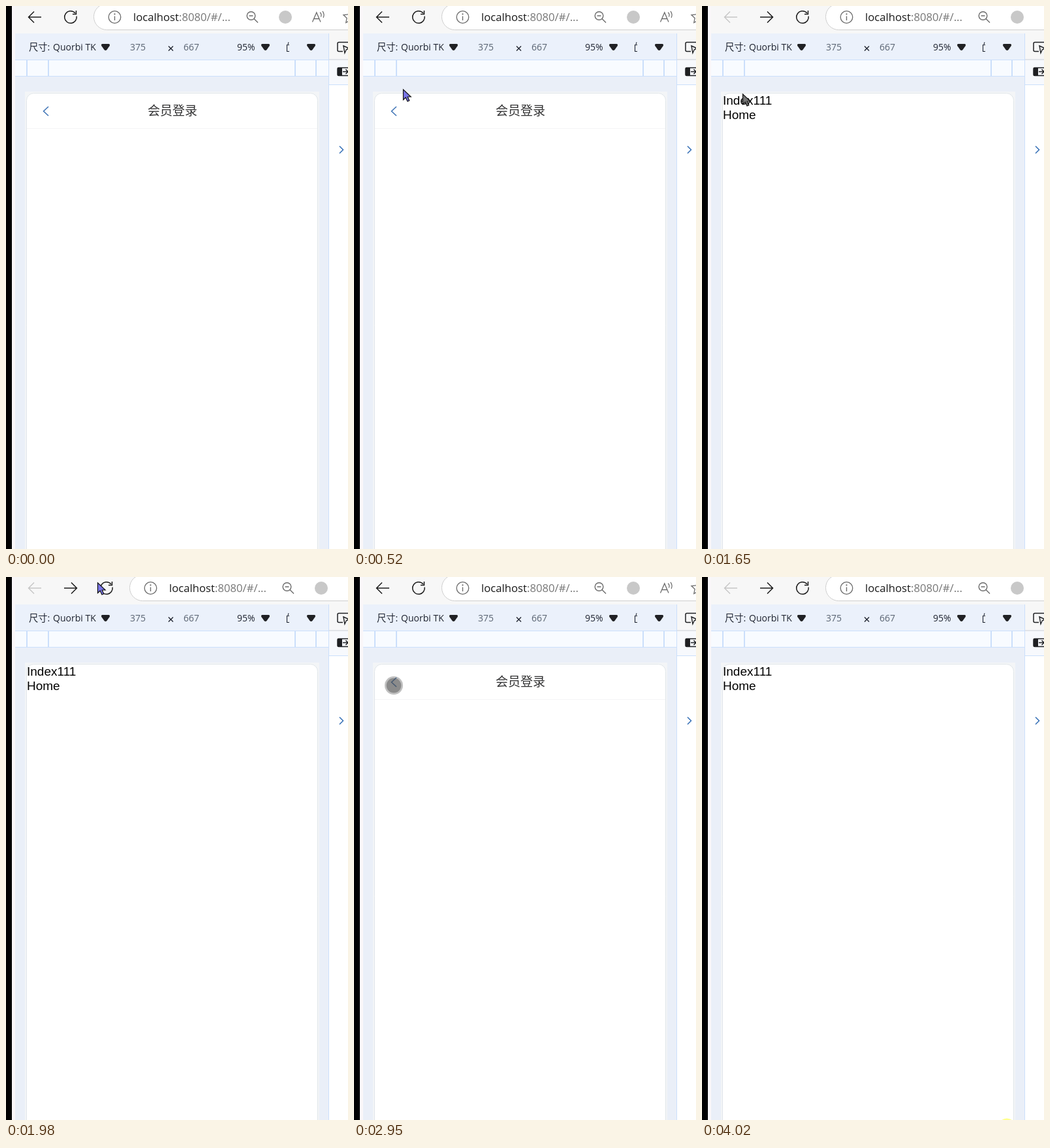
An HTML page with a canvas for the animation above (4.1 s loop, 524x831 px).

```html
<!DOCTYPE html>
<html lang="zh">
<head>
<meta charset="utf-8">
<title>Browser back and forward</title>
<style>
html, body { margin: 0; width: 100%; height: 100%; overflow: hidden; background: #fff; }
canvas { display: block; width: 524px; height: 831px; }
</style>
</head>
<body>
<canvas id="stage" width="524" height="831"></canvas>
<script>
const ctx = document.getElementById('stage').getContext('2d');
const LOOP = 4100;
const UI = '"Open Sans", "Noto Sans CJK SC", "Noto Sans CJK", sans-serif';
const PAGE = '"Liberation Sans", Arial, sans-serif';
const LINE = '#cbdffb';

// Pointer runs: evenly spaced hard steps from start to end.
const runs = [
  { start: 60, end: 520, points: [[409, 767], [331, 643], [233, 423], [158, 261], [115, 162], [88, 104], [78, 116], [75, 127]] },
  { start: 590, end: 850, points: [[70, 145], [60, 154], [55, 163], [58, 167], [61, 166]] },
  { start: 1650, end: 2100, points: [[62, 134], [72, 108], [94, 72], [122, 38], [148, 14], [140, 8], [112, 12], [96, 17]] },
  { start: 2565, end: 2830, points: [[96, 18], [88, 62], [74, 118], [64, 150], [61, 166]] },
  { start: 3080, end: 3340, points: [[70, 180], [117, 254], [195, 381], [297, 562], [395, 747]] }
];

function pointerAt(t) {
  if (t < 60 || t >= 3410) return null;
  const run = runs.filter(r => r.start <= t).pop();
  const last = run.points.length - 1;
  const step = (run.end - run.start) / last;
  return run.points[Math.min(last, Math.floor((t - run.start) / step + 1e-6))];
}

const between = (t, a, b) => t >= a && t < b;

function rect(x, y, w, h, color) {
  ctx.fillStyle = color;
  ctx.fillRect(x, y, w, h);
}

function text(str, x, y, size, color, family = UI, align = 'left', weight = 400) {
  ctx.font = `${weight} ${size}px ${family}`;
  ctx.textAlign = align;
  ctx.fillStyle = color;
  ctx.fillText(str, x, y);
}

function stroke(path, color, width = 1.5) {
  ctx.strokeStyle = color;
  ctx.lineWidth = width;
  ctx.stroke(new Path2D(path));
}

function fill(path, color) {
  ctx.fillStyle = color;
  ctx.fill(new Path2D(path));
}

function disc(x, y, r, color) {
  ctx.beginPath();
  ctx.arc(x, y, r, 0, Math.PI * 2);
  ctx.fillStyle = color;
  ctx.fill();
}

function ring(x, y, r, color, width, from = 0, to = Math.PI * 2) {
  ctx.beginPath();
  ctx.arc(x, y, r, from, to);
  ctx.strokeStyle = color;
  ctx.lineWidth = width;
  ctx.stroke();
}

function roundBox(x, y, w, h, r, color, border, width = 1) {
  ctx.beginPath();
  ctx.roundRect(x, y, w, h, r);
  if (color) {
    ctx.fillStyle = color;
    ctx.fill();
  }
  if (border) {
    ctx.strokeStyle = border;
    ctx.lineWidth = width;
    ctx.stroke();
  }
}

function star(cx, cy, r) {
  ctx.beginPath();
  for (let i = 0; i < 10; i++) {
    const a = -Math.PI / 2 + i * Math.PI / 5;
    const d = i % 2 ? r * 0.48 : r;
    ctx.lineTo(cx + d * Math.cos(a), cy + d * Math.sin(a));
  }
  ctx.closePath();
  ctx.strokeStyle = '#6b6b6b';
  ctx.lineWidth = 1.3;
  ctx.stroke();
}

function addressBar(shifted, hover) {
  rect(14, 0, 510, 42, '#f7f7f7');
  stroke('M54 17H34.5M43 8.5L34.5 17L43 25.5', shifted ? '#c6c6c6' : '#1b1b1b');
  if (shifted) {
    if (hover) roundBox(74, -6, 50, 43, 5, '#d4d4d4');
    stroke('M89 17H108.5M100 8.5L108.5 17L100 25.5', '#1b1b1b');
  }
  ctx.save();
  if (shifted) ctx.translate(55, 0);

  ring(99, 17, 9.3, '#1b1b1b', 1.5, -0.15, Math.PI * 1.78);
  stroke('M107.5 7V12.5H102', '#1b1b1b');

  roundBox(134.5, -3.5, 460, 40, 20, '#fff', '#cfcfcf');
  ring(166.5, 17, 9.3, '#6b6b6b', 1.3);
  stroke('M166.5 15.5V22', '#6b6b6b', 1.4);
  disc(166.5, 12.4, 1.1, '#6b6b6b');
  text('localhost', 195, 23, 16.7, '#1a1a1a');
  text(':8080/#/...', 265, 23, 16.7, '#767676');

  ring(375.5, 15, 6.3, '#6b6b6b', 1.4);
  stroke('M380 19.5L386 25.5M372.5 15H378.5', '#6b6b6b', 1.4);
  disc(428, 17, 10, '#c8c8c8');
  stroke('M469.5 24.5L475.8 10L482 24.5M471.8 19.5H479.8', '#6b6b6b', 1.3);
  ring(477, 14, 6, '#6b6b6b', 1.2, -0.8, 0.45);
  ring(477, 14, 10, '#6b6b6b', 1.2, -0.65, 0.4);
  star(527, 17, 10.5);
  ctx.restore();
}

function dropMark(x) {
  fill(`M${x - 5} 58H${x + 5}Q${x + 7.5} 58.5 ${x + 6} 61.2L${x + 2} 67Q${x} 69 ${x - 2} 67L${x - 6} 61.2Q${x - 7.5} 58.5 ${x - 5} 58Z`, '#202124');
}

function deviceBar() {
  rect(14, 42, 480, 40, '#ebf1fb');
  text('尺寸:', 35, 68, 14.3, '#1f2430');
  text('Quorbi TK', 72, 68, 14, '#1f2430');
  text('375', 190, 68, 14, '#5a6472');
  stroke('M249 61.5L256 68.5M256 61.5L249 68.5', '#1f2430', 1.4);
  text('667', 272, 68, 14, '#5a6472');
  text('95%', 354, 68, 14, '#1f2430');
  [152.5, 397.5, 467.5].forEach(dropMark);
  // Left edge of a clipped label
  stroke('M433 55.5L432 58.5M434 59.5H430.5V69.5H434', '#1f2430', 1.1);

  rect(14, 82, 480, 26, '#f8fbff');
  rect(14, 82, 480, 1, LINE);
  rect(14, 107, 480, 1, LINE);
  [31, 64, 442, 474].forEach(x => rect(x, 83, 2, 24, LINE));
}

function sidePanel() {
  rect(495, 42, 29, 40, '#f7f7f7');
  rect(495, 82, 29, 38, '#f7f9fd');
  rect(495, 81, 29, 2, '#e0e3e8');
  rect(495, 120, 29, 1, LINE);
  rect(495, 121, 29, 710, '#fff');
  rect(494, 42, 1, 789, LINE);

  stroke('M516 69.5H510Q508 69.5 508 67.5V57.5Q508 55.5 510 55.5H526', '#1f2023', 1.5);
  fill('M517 61L526 65L521.5 66.5L519 72Z', '#f7f7f7');
  stroke('M517 61L526 65L521.5 66.5L519 72Z', '#1f2023', 1.4);
  roundBox(508, 94.5, 20, 12, 2, '#f7f9fd', '#1f2023', 1.5);
  rect(508, 94, 7, 13, '#1f2023');
  stroke('M516 100.5H524M520.5 97L524 100.5L520.5 104', '#1f2023', 1.5);
  stroke('M511 214.5L516.5 220L511 225.5', '#3a73b8', 1.6);
}

function devicePage(login) {
  rect(14, 108, 480, 723, '#eaeff8');
  rect(29, 131, 451, 700, '#f3f5f7');
  roundBox(31.5, 133.5, 446, 720, 11, '#fff', '#e1e6ea');
  if (login) {
    rect(32, 187, 445, 1, '#f4f5f6');
    stroke('M65 154L57.5 161L65 168', '#3d73b5', 1.5);
    text('会员登录', 255, 167, 19, '#323233', '"Noto Sans CJK SC", "Noto Sans CJK", sans-serif', 'center', 300);
  } else {
    text('Index111', 32, 151, 19, '#000', PAGE);
    text('Home', 32, 173, 19, '#000', PAGE);
  }
}

function pointer([x, y]) {
  if (y >= 140) {
    disc(x, y, 14, 'rgba(90,90,90,.38)');
    disc(x, y, 11.3, 'rgba(70,70,70,.44)');
    return;
  }
  ctx.save();
  ctx.translate(x, y);
  const shape = 'M.5 .8V16.5L4.2 13L7 19L9.8 17.7L7.2 12H12.2Z';
  fill(shape, y > 132 ? '#777' : '#7a76e8');
  stroke(shape, '#111', 1.2);
  ctx.restore();
}

function draw(t) {
  rect(0, 0, 524, 831, '#faf7f9');
  rect(0, 0, 9, 831, '#000');
  const login = t < 1140 || between(t, 2440, 3011);
  const shifted = between(t, 1210, 2565) || t >= 3080;
  addressBar(shifted, between(t, 2310, 2565));
  deviceBar();
  devicePage(login);
  sidePanel();
  const at = pointerAt(t);
  if (at) pointer(at);
  if (t >= 4020) disc(467, 842, 13.5, '#ffff8c');
}

const begin = performance.now();
function tick() {
  draw((performance.now() - begin) % LOOP);
  requestAnimationFrame(tick);
}
tick();
</script>
</body>
</html>
```
